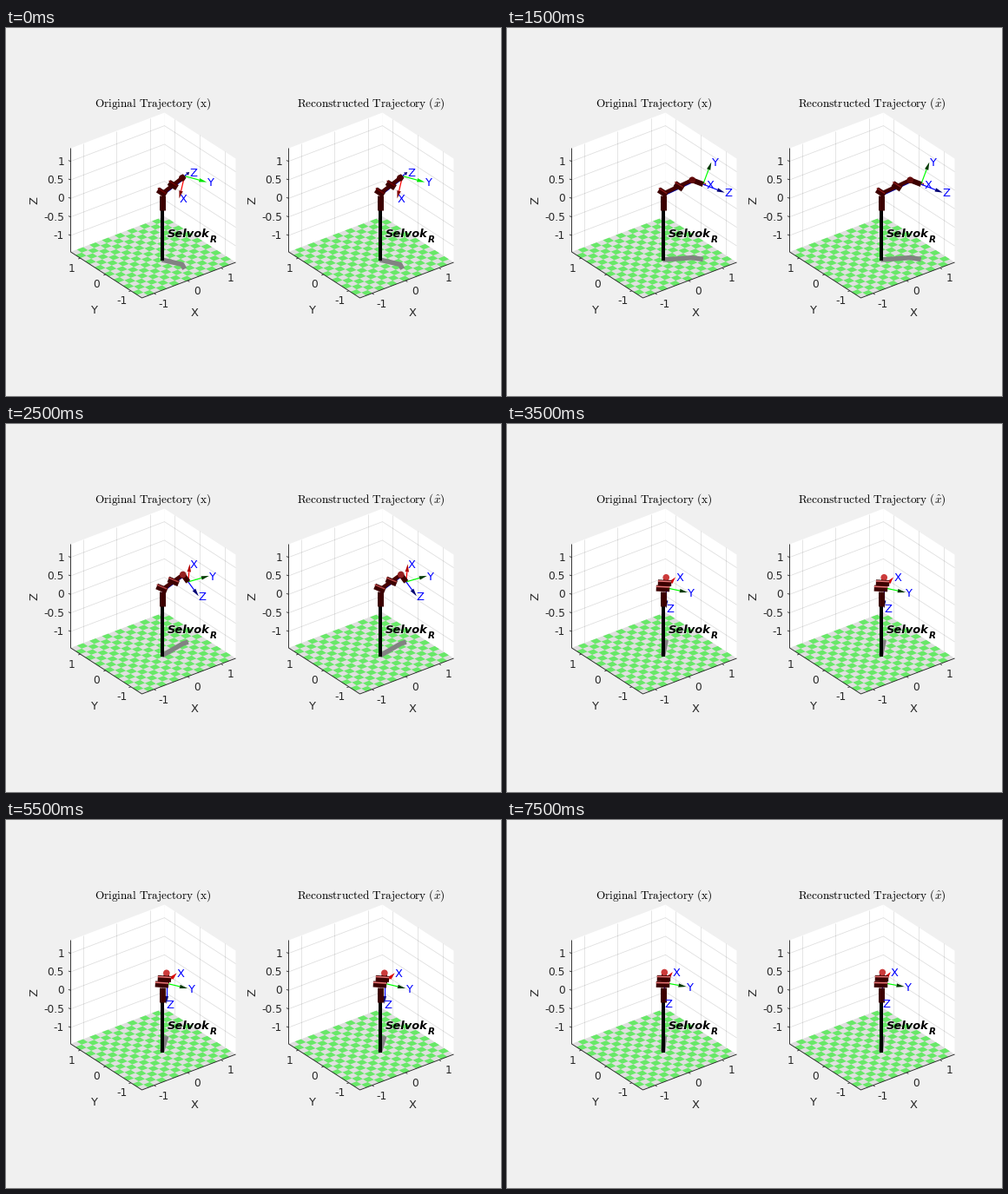
These frames come from a looping animation (570x424 px, 8 s). A matplotlib script:

```python
import numpy as np
import matplotlib.pyplot as plt
from matplotlib.animation import FuncAnimation
from matplotlib.collections import PolyCollection

W, H, DPI = 570, 424, 100
PT = 72 / DPI
STEPS, STEP_MS = 16, 500
PANELS = (0, 251)
INK, MAROON = "#262626", "#3c0000"

plt.rcParams["font.family"] = "DejaVu Sans"
plt.rcParams["mathtext.fontset"] = "cm"

fig = plt.figure(figsize=(W / DPI, H / DPI), dpi=DPI, facecolor="#f0f0f0")
ax = fig.add_axes([0, 0, 1, 1])
ax.set_xlim(0.5, W + 0.5)
ax.set_ylim(H, 0)
ax.axis("off")

# Corners of the 3-D box on screen
LEFT, FRONT = np.array([75, 258]), np.array([157, 311])
BACK, RIGHT = np.array([183, 217]), np.array([265, 270])
UP = np.array([0, -119.5])
EX, EY = BACK - LEFT, LEFT - FRONT

# Screen shift per world unit along x, y, z
AXES = np.array([EX / 2.8, EY / 2.8, (0, -42.7)])
FOOT = np.array([180, 267])
SHOULDER = np.array([0, 0, 1.78])
ARM, ELBOW, TOOL, TRIAD, BARREL = 0.77, 0.55, 0.28, 0.555, 0.16


def line(pts, color, w, z, **kw):
    x, y = np.transpose(pts)
    return ax.plot(x, y, color=color, lw=w * PT, zorder=z,
                   solid_capstyle="butt", **kw)[0]


def label(x, y, s, size=12.2, color=INK, ha="center", **kw):
    """Place capitals or digits with their middle at y."""
    return ax.text(x, y + 0.365 * size, s, fontsize=size * PT, color=color,
                   ha=ha, va="baseline", zorder=9, **kw)


def draw_floor(d, n=15):
    a, b = EX / n, EY / n
    cells = [FRONT + d + i * a + j * b
             for i in range(n) for j in range(n) if (i + j) % 2]
    for quads, color in (([np.array([FRONT, RIGHT, BACK, LEFT]) + d], "#dfdfdf"),
                         ([[p, p + a, p + a + b, p + b] for p in cells], "#68e868")):
        ax.add_collection(PolyCollection(quads, facecolors=color, lw=0, zorder=1))


def draw_stage(dx):
    d = np.array([dx, 0])
    walls = ([LEFT, BACK, BACK + UP, LEFT + UP],
             [BACK, RIGHT, RIGHT + UP, BACK + UP])
    ax.add_collection(PolyCollection([np.array(p) + d for p in walls],
                                     facecolors="white", lw=0, zorder=0))
    draw_floor(d)

    grid = dict(color=INK, w=0.8, z=0.5, alpha=0.15)
    for v in (-1, 0, 1):
        fx, fy = 0.487 + 0.357 * v, 0.51 + 0.355 * v
        for p in (LEFT + fx * EX + d, RIGHT + fy * EY + d):
            line([p, p + UP], **grid)
        tx, ty = FRONT + fx * EX + d, FRONT + fy * EY + d
        line([tx, tx + (2.2, 1.4)], INK, 0.8, 3)
        line([ty, ty + (-2.4, 0.9)], INK, 0.8, 3)
        label(tx[0] + 10.8, tx[1] + 11.5, str(v))
        label(ty[0] - 10.2, ty[1] + 11, str(v))
    for v in np.arange(-1, 1.1, 0.5):
        p = np.array([75 + dx, 196.3 - 42.7 * v])
        line([p, p + EX, p + EX - EY], **grid)
        line([p, p - (2.6, 1)], INK, 0.8, 3)
        label(67.5 + dx, p[1] - 0.3, f"{v:g}", ha="right")
    line(np.array([LEFT + UP, LEFT, FRONT, RIGHT]) + d, INK, 0.9, 3)

    label(218 + dx, 327.5, "X", 13)
    label(102.3 + dx, 324.5, "Y", 13)
    ax.text(40 + dx, 198.3, "Z", fontsize=13 * PT, color=INK, rotation=90,
            ha="right", va="center", zorder=9)
    bold = dict(color="black", ha="left", weight="bold", style="italic")
    label(186 + dx, 236.3, "Selvok", 13, **bold)
    label(235.7 + dx, 243, "R", 10.4, **bold)
    line([(180 + dx, 195), (180 + dx, 267.5)], "black", 4, 5)


def heading(az, pitch=0):
    a, p = np.radians((az, pitch))
    return np.array([np.cos(p) * np.cos(a), np.cos(p) * np.sin(a), np.sin(p)])


def progress(t):
    """0 to 1 over the 3.5 s swing, slower at both ends."""
    u = min(t / 3.5, 1)
    return u - 0.25 * np.sin(2 * np.pi * u) / (2 * np.pi)


def pose(t):
    """Joint positions and tool axes in world units."""
    s = progress(t)
    rest = max(t - 3.5, 0)
    sway = 5.5 * np.sin(np.pi / 2 * (rest / 3) ** 3)
    yaw = -63 + 110 * s ** 1.35 - sway
    arm = ARM * heading(yaw, 46 - 53 * s + 0.5 * rest)
    elbow, wrist = SHOULDER + ELBOW * arm, SHOULDER + arm
    barrel = BARREL * heading(max(yaw, 0) - 90)

    az, pitch, roll = -112 + 141 * s - sway, 38 - 128 * s, np.radians(203 * (s - 1))
    z = heading(az, pitch)
    x = np.cos(roll) * heading(az, pitch + 90) + np.sin(roll) * heading(az - 90)
    return elbow, wrist, wrist + TOOL * z, barrel, (x, np.cross(z, x), z)


def arrow(org, tip, name, shaft, head):
    v = tip - org
    size = max(np.hypot(*v), 1)
    u = v / size
    n = 2.2 * np.array([-u[1], u[0]])
    base = tip - u * min(9, size * 0.5)
    cone = ax.fill(*np.transpose([tip, base + n, base - n]),
                   color=head, lw=0, zorder=6)[0]
    return [line([org, base], shaft, 1.2, 6), cone,
            label(*(tip + (4.5, 0)), name, 13, "#0000ff")]


def cylinder(mid, half, shine):
    ends = np.array([mid - half, mid + half])
    glow = (0.42 + 0.5 * shine, 0.47 * shine, 0.47 * shine)
    return [line(ends, MAROON, 7, 7), line(ends - (0, 1.9), glow, 1.5, 7)]


def draw_robot(t, dx):
    def project(p):
        return np.asarray(p) @ AXES + FOOT + (dx, 0)

    elbow, wrist, org, barrel, triad = pose(t)
    shine = progress(t) ** 2
    joints = np.array([(0, 0, 0), elbow, wrist, org])
    shadow = project(joints * (1, 1, 0))
    out = [line(shadow, "#828282", 5.5, 4, solid_joinstyle="round")]

    heads = ((0.5 + 0.35 * shine, 0, 0), (0, 0.22 + 0.68 * max(1 - t, 0), 0),
             (0, 0, 0.45))
    shafts = ("#ff0000", "#00ff00", "#0000ff")
    for axis, name, shaft, head in zip(triad, "XYZ", shafts, heads):
        out += arrow(project(org), project(org + TRIAD * axis), name, shaft, head)

    chain = project([SHOULDER, elbow, wrist])
    out.append(line(chain + (0, 2), "#0000a0", 2.5, 6.5))
    out.append(line(chain, "#460000", 4.5, 6.6))
    out.append(line(project([wrist, org]), MAROON, 6, 6.6))
    out.append(line([chain[0] + (0, 2), chain[0] + (0, 19)], MAROON, 7, 6.7))
    half = barrel @ AXES
    out += cylinder(chain[1], half, shine)
    out += cylinder(chain[0] - (0, 1.5), half, shine)
    tint = (0.3 + 0.5 * shine, 0.23 * shine, 0.23 * shine)
    out.append(ax.add_patch(plt.Circle(chain[2], 3.8, fc=tint, lw=0, zorder=6.9)))
    return out


for dx in PANELS:
    draw_stage(dx)
for x, s in ((170, r"$\mathrm{Original\ Trajectory\ (x)}$"),
             (421, r"$\mathrm{Reconstructed\ Trajectory\ (}\hat{x}\mathrm{)}$")):
    ax.text(x, 90.5, s, fontsize=13.3 * PT, color="black",
            ha="center", va="baseline")

live = []


def update(i):
    while live:
        live.pop().remove()
    for dx in PANELS:
        live.extend(draw_robot(i * STEP_MS / 1000, dx))
    return live


anim = FuncAnimation(fig, update, frames=STEPS, interval=STEP_MS,
                     init_func=lambda: [], repeat=True, repeat_delay=0,
                     blit=False, cache_frame_data=False)
plt.show()
```
